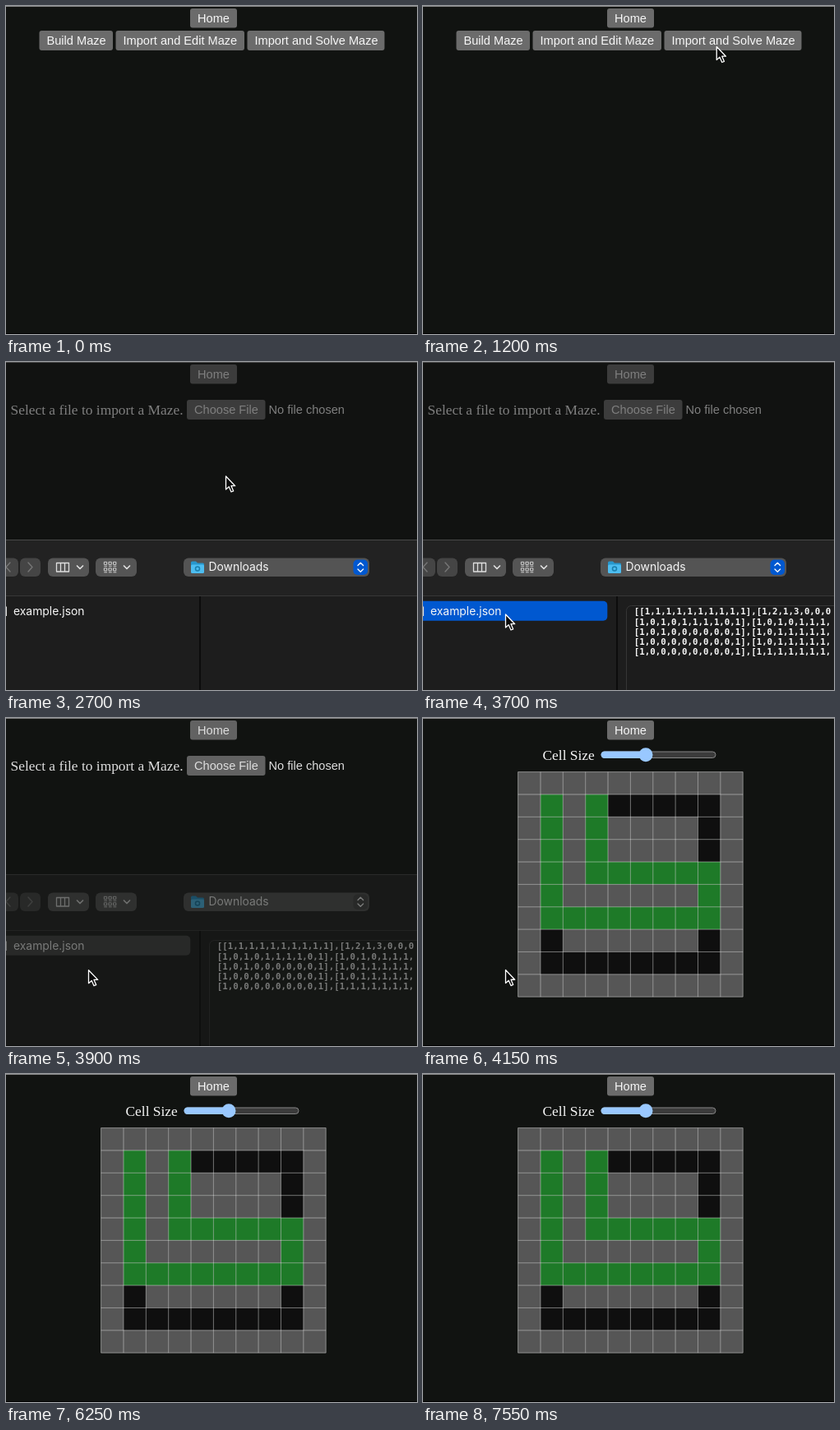
Animation of 500 by 399 pixels, one loop 7650 ms. Source, as an HTML page:

```html
<!DOCTYPE html>
<html lang="en">
<head>
<meta charset="utf-8">
<title>Maze import</title>
<style>
  html, body { margin: 0; width: 100%; height: 100%; overflow: hidden; background: #111311; }
  svg { display: block; width: 500px; height: 399px; }
  text { fill: #f6f6f6; white-space: pre; }
  .ui { font: 14.6px "Liberation Sans", Arial, sans-serif; }
  .serif { font: 17.4px "Liberation Serif", Times, serif; }
  .mac { font: 13.9px Inter, sans-serif; }
  .mono { font: bold 10.75px "DejaVu Sans Mono", monospace; }
  .btn { fill: #6b6b6b; }
  .btn.down { fill: #7f7f7f; }
  .icon { fill: none; stroke: #dedede; stroke-width: 1.3; stroke-linecap: round; stroke-linejoin: round; }
  .accent { fill: #0058d0; }
  .closing .accent { fill: #444; }
</style>
</head>
<body>
<svg id="stage" viewBox="0 0 500 399"></svg>
<script>
const LOOP = 7650, STEP = 50, CELL = 27.36;

// 1 wall, 0 open, 2 start, 3 end, 4 solution
const maze = ["1111111111", "1213000001", "1414111101", "1414111101", "1414444441",
              "1411111141", "1444444441", "1011111101", "1000000001", "1111111111"];

const text = (cls, x, y, s) => `<text class="${cls}" x="${x}" y="${y}">${s}</text>`;
const rect = (x, y, w, h, fill, r = 0, extra = "") =>
  `<rect x="${x}" y="${y}" width="${w}" height="${h}" rx="${r}" fill="${fill}" ${extra}/>`;
const icon = (d, extra = "") => `<path class="icon" d="${d}" ${extra}/>`;
const group = (id, body) => `<g id="${id}">${body}</g>`;
const button = (id, x, y, w, h, label) =>
  `<rect id="${id}" class="btn" x="${x}" y="${y}" width="${w}" height="${h}" rx="3"/>` +
  text("ui", x + 9, y + h / 2 + 4.9, label);

function mazeCells() {
  let out = "";
  maze.forEach((row, r) => [...row].forEach((c, i) => {
    const fill = c === "1" ? "#565656" : c === "0" ? "#0f0f0f" : "#1e7a28";
    out += rect(115.6 + i * CELL, 65.6 + r * CELL, CELL, CELL, fill);
  }));
  let lines = "";
  for (let i = 0; i <= 10; i++) {
    const d = i * CELL;
    lines += `M${115.6 + d} 65.6v${10 * CELL}M115.6 ${65.6 + d}h${10 * CELL}`;
  }
  return out + `<path d="${lines}" stroke="#fff" stroke-opacity=".42"/>`;
}

function preview() {
  const json = "[" + maze.map(r => "[" + [...r.replace(/4/g, "0")].join() + "]").join() + "]";
  let out = "";
  for (let i = 0; i < 5; i++) {
    const from = i ? 44 * i + 1 : 0;
    out += text("mono", 256.8, 307.2 + i * 12.3, json.slice(from, from + 37));
  }
  return rect(247.5, 296.5, 270, 200, "#1c1c1c", 6, 'stroke="#363636"') + out;
}

function dialog() {
  let tiles = "";
  for (let i = 0; i < 6; i++)
    tiles += `M${119.7 + i % 3 * 5.6} ${i < 3 ? 243.3 : 250.8}h3v3h-3zm0 5h3`;
  return rect(-5, 216.5, 510, 330, "#222", 0, 'stroke="#484848"') +
    rect(0, 284, 500, 260, "#1d1d1d") + rect(0, 284, 500, 1, "#383838") +
    rect(235, 285, 2, 260, "#0c0c0c") +
    rect(-20, 238.5, 35, 22.5, "#454545", 6) + rect(17, 238.5, 25, 22.5, "#454545", 6) +
    icon("M5 244l-5 5.5 5 5.5M27 244l5 5.5-5 5.5", 'style="stroke:#777"') +
    rect(51, 238.5, 50, 22.5, "#555", 6) + rect(109, 238.5, 50, 22.5, "#555", 6) +
    icon("M61.5 244.5h15v10.5h-15zM66.5 244.5v10.5M71.5 244.5v10.5") +
    icon("M86.5 248l3.5 3.5 3.5-3.5M143.5 248l3.5 3.5 3.5-3.5", 'style="stroke-width:1.7"') +
    icon(tiles, 'style="stroke-width:.9"') +
    rect(216, 238.5, 226, 22.5, "#545454", 6) +
    '<path fill="#2797cd" d="M225 244q0-1.5 1.5-1.5h4.5l2 2h6.500q1.5 0 1.5 1.5v10h-16z"/>' +
    rect(225, 246.5, 16, 10.5, "#4dbdf0", 1.5) +
    '<circle cx="233" cy="251.5" r="2.5" fill="none" stroke="#197fad" stroke-width="1.5"/>' +
    text("mac", 246.5, 254.2, "Downloads") +
    '<rect class="accent" x="422.5" y="240.5" width="17.5" height="18.5" rx="5"/>' +
    icon("M428 247.5l3.3-3.3 3.3 3.3M428 252l3.3 3.3 3.3-3.3", 'style="stroke:#fff"') +
    group("picked", '<rect class="accent" x="-10" y="290.7" width="234.3" height="24" rx="5"/>') +
    rect(-2, 297.5, 3, 11.5, "#ddd") + text("mac", 9, 307.7, "example.json") +
    group("preview", preview());
}

const stage = document.getElementById("stage");
stage.innerHTML =
  rect(0, 0, 500, 399, "#111311") + rect(0, 0, 500, 1, "#858585") + rect(0, 398, 500, 1, "#000") +
  button("home", 224, 3, 57, 23.5, "Home") +
  group("menu",
    button("build", 40.5, 30, 89.5, 24, "Build Maze") +
    button("edit", 133.5, 30, 156.5, 24, "Import and Edit Maze") +
    button("solve", 293.5, 30, 167, 24, "Import and Solve Maze")) +
  group("pick",
    text("serif", 5.5, 64, "Select a file to import a Maze.") +
    button("choose", 220, 46, 95.5, 24, "Choose File") +
    text("ui", 319.5, 62.9, "No file chosen")) +
  group("solved",
    text("serif", 145.5, 51, "Cell Size") +
    rect(217, 41, 139, 7.5, "#3b3b3b", 3.7, 'stroke="#858585"') +
    rect(216.5, 40.5, 54, 8.5, "#99c8ff", 4.2) +
    '<circle cx="271" cy="44.8" r="8.5" fill="#99c8ff"/>' + mazeCells()) +
  rect(0, 0, 500, 399, "#131313", 0, 'id="dim"') +
  group("dialog", dialog()) +
  group("cursor", '<path d="M.5 0V16L4.2 12.700 7 19 9.700 17.900 7 11.700H11.700z" ' +
    'fill="#0a0a0a" stroke="#fff" stroke-width="1.3" stroke-linejoin="round"/>');

const $ = id => document.getElementById(id);
const show = (id, on) => { $(id).style.display = on ? "" : "none"; };
const clamp = u => Math.max(0, Math.min(1, u));

const easeIn = u => u * u, easeOut = u => 1 - (1 - u) ** 2, soft = u => u ** 1.4;
// time, x, y, easing towards the next point
const path = [
  [500, 300, 384, easeOut], [1250, 357, 48, easeOut],
  [1850, 357, 48, soft], [2100, 314, 61, easeOut], [2350, 267, 60, easeOut],
  [2500, 267, 60, soft], [2700, 267, 139, easeOut], [3150, 105, 303, easeOut],
  [3700, 100, 307, easeOut], [4300, 100, 306.5, easeIn], [5050, 505, 331, easeIn]
];

function cursorAt(t) {
  const i = path.findIndex((p, n) => n && t < p[0]);
  const [t0, x0, y0, ease] = path[i - 1], [t1, x1, y1] = path[i];
  const u = ease((t - t0) / (t1 - t0));
  return [x0 + (x1 - x0) * u, y0 + (y1 - y0) * u];
}

function draw(t) {
  show("menu", t < 1500);
  show("pick", t >= 1500 && t < 4000);
  show("solved", t >= 4000);
  $("solve").classList.toggle("down", t >= 1300 && t < 1500);
  $("choose").classList.toggle("down", t >= 2350 && t < 2500);

  const opened = clamp((t - 2450) / 200), closed = clamp((t - 3800) / 200);
  const fade = clamp(opened * (1 - closed * 1.1));
  show("dialog", fade > 0);
  $("dialog").style.opacity = fade;
  $("dialog").setAttribute("transform", `translate(0 ${-52 * closed - 40 * (1 - opened) ** 2})`);
  $("dialog").classList.toggle("closing", closed > 0);
  $("dim").style.opacity = 0.52 * fade ** 2;
  show("picked", t >= 3150);
  show("preview", t >= 3200);

  const visible = t >= 500 && t < 5050;
  show("cursor", visible);
  if (visible) $("cursor").setAttribute("transform", `translate(${cursorAt(t)})`);
}

const start = performance.now();
function tick() {
  const t = (performance.now() - start) % LOOP;
  draw(Math.floor(t / STEP) * STEP);
  requestAnimationFrame(tick);
}
tick();
</script>
</body>
</html>
```
